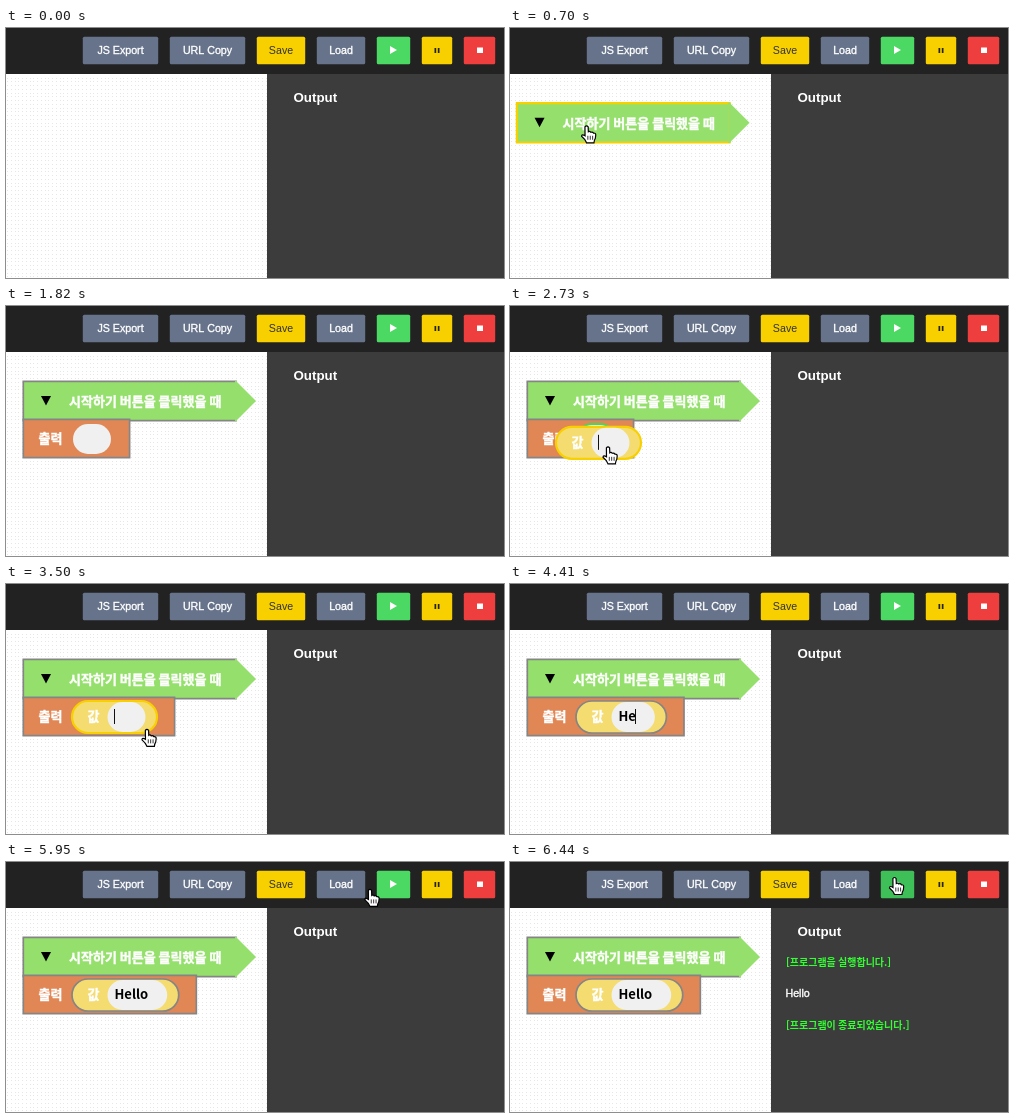
An HTML page with a canvas for the animation above (7350 ms loop, 498x250 px).

```html
<!DOCTYPE html>
<html lang="ko">
<head>
<meta charset="utf-8">
<style>
html, body { margin: 0; width: 100%; height: 100%; overflow: hidden; background: #3c3c3c; }
canvas { display: block; width: 498px; height: 250px; }
</style>
</head>
<body>
<canvas id="stage" width="498" height="250"></canvas>
<script>
const ctx = document.getElementById('stage').getContext('2d');
const LOOP = 7350, STEP = 70, DOT_GAP = 3.75;
const KOREAN = '"Noto Sans CJK KR", "Noto Sans CJK", sans-serif';
const LATIN = '"Liberation Sans", sans-serif';
const GOLD = '#f8d000', SLATE = '#66738a', EDGE = '#858585', INK = '#222';

const hand = new Path2D('M-1.6 1Q0-1 1.6 1L1.8 6Q3.3 5 4.2 6.5Q6 5.7 6.9 7.3Q9.2 7 9.2 9.2L8.8 12.5Q7.6 14.5 7.4 17L0 17Q-.8 14-5 10.5Q-4.8 7.8-1.5 10Z');

const easeOut = k => 1 - (1 - k) ** 2;
const easeInOut = k => k * k * (3 - 2 * k);
const within = (v, from, to) => v >= from && v < to;

// Each drag enters from the left edge, slows down and ends at the drop.
const drags = {
  start: { from: 420, to: 840, a: [-8, 95], b: [86, 97], ease: easeOut },
  print: { from: 1330, to: 1610, a: [5, 113], b: [83, 122], ease: easeOut },
  value: { from: 2240, to: 2800, a: [-10, 128], b: [98.7, 140], ease: easeOut }
};
const move = (from, to, a, b) => ({ from, to, a, b, ease: easeInOut });
const leave = ({ to, b }) => move(to, to + 210, b, [-16, b[1]]);

const field = [128, 138], rest = [162, 156], aside = [180, 149], overPrint = [186, 129], play = [383.5, 14.5];
const moves = [
  drags.start, leave(drags.start),
  drags.print, leave(drags.print),
  drags.value, move(2800, 2940, drags.value.b, aside),
  move(2940, 3220, aside, field), move(3220, 3360, field, field), move(3360, 4060, field, rest),
  move(5250, 5390, rest, overPrint), move(5390, 6090, overPrint, play), move(6090, LOOP, play, play)
];
moves[8].ease = k => easeInOut(Math.min(1, k * 2));

const pressed = t => Object.values(drags).some(d => within(t, d.from, d.from + 280))
  || within(t, 3220, 3360) || within(t, 6160, 6300);

function pointerAt(t) {
  const m = moves.find(m => within(t, m.from, m.to));
  if (!m) return null;
  const k = m.ease((t - m.from) / (m.to - m.from));
  const [x, y] = m.a.map((v, i) => v + (m.b[i] - v) * k);
  return { x, y };
}

// Two letters with a pause between, then the rest quickly.
function typedAt(t) {
  const slow = Math.floor((t - 4060) / 280) + 1;
  const fast = Math.floor((t - 4550) / 140) + 3;
  return 'Hello'.slice(0, Math.max(0, t < 4550 ? slow : fast));
}

function text(str, x, y, size, color, family = LATIN, weight = 400, thicken = 0) {
  ctx.font = `${weight} ${size}px ${family}`;
  ctx.fillStyle = color;
  ctx.fillText(str, x, y);
  if (thicken) {
    ctx.lineWidth = thicken;
    ctx.strokeStyle = color;
    ctx.strokeText(str, x, y);
  }
}

const label = (str, x, y) => text(str, x, y, 13, '#fff', KOREAN, 700, .4);

function pill(x, y, w, h, r, fill, stroke, line) {
  ctx.beginPath();
  ctx.roundRect(x, y, w, h, r);
  ctx.fillStyle = fill;
  ctx.fill();
  if (stroke) {
    ctx.lineWidth = line;
    ctx.strokeStyle = stroke;
    ctx.stroke();
  }
}

function triangle(points, color) {
  ctx.beginPath();
  points.forEach(p => ctx.lineTo(...p));
  ctx.fillStyle = color;
  ctx.fill();
}

const edge = hot => hot ? [GOLD, 2.2] : [EDGE, 1.7];

function startBlock(x, y, hot) {
  const green = '#95e06c';
  pill(x + .3, y + .4, 212.7, 39.3, 0, green, ...edge(hot));
  ctx.fillRect(x + 212, y, 2, 40);
  triangle([[x + 212, y], [x + 213, y], [x + 233, y + 20], [x + 213, y + 40], [x + 212, y + 40]], green);
  triangle([[x + 18, y + 15], [x + 28, y + 15], [x + 23, y + 24.5]], '#000');
  label('시작하기 버튼을 클릭했을 때', x + 46, y + 25);
}

function printBlock(x, y, width, hot, target) {
  pill(x + .3, y + .4, width - .7, 38.3, 0, '#e08755', ...edge(hot));
  label('출력', x + 15.5, y + 24);
  pill(x + 50, y + 5, 38, 30, 15, '#f0f0f0', target && '#46d65c', 2);
}

function valueBlock(x, y, width, typed, caret, hot) {
  pill(x + 1, y + 1, width + 47, 32, 16, '#f4dc70', ...edge(hot));
  label('값', x + 16.5, y + 21);
  pill(x + 36.5, y + 2, width, 30, 15, '#f0f0f0');
  text(typed, x + 43.5, y + 21, 13, '#000', KOREAN, 700);
  if (caret) {
    ctx.fillStyle = '#111';
    ctx.fillRect(Math.floor(x + 43.5 + ctx.measureText(typed).width), y + 9, 1, 15);
  }
}

function dottedPaper() {
  ctx.fillStyle = '#fff';
  ctx.fillRect(0, 46, 261, 204);
  ctx.fillStyle = '#e6e6e6';
  for (let y = .85 + 13 * DOT_GAP; y < 250; y += DOT_GAP)
    for (let x = 1.1; x < 261; x += DOT_GAP) ctx.fillRect(Math.round(x), Math.round(y), 1, 1);
}

function workspace(t, pointer) {
  ctx.save();
  ctx.beginPath();
  ctx.rect(0, 46, 261, 204);
  ctx.clip();
  dottedPaper();

  const typed = typedAt(t);
  ctx.font = `700 13px ${KOREAN}`;
  const fieldWidth = Math.max(38, ctx.measureText(typed).width + 26);
  const joined = t >= drags.value.to;
  const printWidth = joined ? fieldWidth + 114 : 107;
  const over = (x, y, w, h) => !!pointer && within(pointer.x, x, x + w) && within(pointer.y, y, y + h);
  const dragging = name => within(t, drags[name].from, drags[name].to);
  const onValue = joined && over(65, 116, fieldWidth + 49, 34);
  const onPrint = !dragging('value') && !onValue && over(17, 113, printWidth + 2, 39);

  if (t >= drags.start.to) startBlock(17, 75, !dragging('print') && over(17, 75, 233, 38));
  else if (dragging('start')) startBlock(pointer.x - 69, pointer.y - 22, true);

  if (t >= drags.print.to) printBlock(17, 113, printWidth, onPrint, dragging('value') && pointer.x > 80);
  else if (dragging('print')) printBlock(pointer.x - 70, pointer.y - 17, 107, true);

  const caret = t < 3780 || within(t, 4060, 5250);
  if (joined) valueBlock(65, 116, fieldWidth, typed, caret, onValue);
  else if (dragging('value')) valueBlock(pointer.x - 52, pointer.y - 20, 38, '', true, true);
  ctx.restore();
}

function header(t) {
  ctx.fillStyle = INK;
  ctx.fillRect(0, 0, 498, 46);
  const buttons = [
    [75, SLATE, 'JS Export'], [75, SLATE, 'URL Copy'], [48, GOLD, 'Save'], [48, SLATE, 'Load'],
    [33, t >= 6020 ? '#3fbf57' : '#4bd964'], [30, GOLD], [31, '#ee3e3e']
  ];
  let x = 77;
  ctx.textAlign = 'center';
  for (const [w, color, caption] of buttons) {
    pill(x - .2, 8.8, w + .4, 27.4, 1.5, color);
    const dark = color === GOLD;
    if (caption) text(caption, x + w / 2, 26, 10.67, dark ? '#333' : '#fff', LATIN, 400, dark ? 0 : .35);
    x += w + 12;
  }
  ctx.textAlign = 'left';
  triangle([[384, 18], [391, 22], [384, 26]], '#fff');
  ctx.fillStyle = INK;
  ctx.fillRect(428.5, 20, 1.7, 5);
  ctx.fillRect(431.8, 20, 1.7, 5);
  ctx.fillStyle = '#fff';
  ctx.fillRect(471, 19.5, 6, 5.5);
}

function output(t) {
  ctx.fillStyle = '#3c3c3c';
  ctx.fillRect(261, 46, 237, 204);
  text('Output', 287.5, 74, 13.33, '#fff', LATIN, 700);
  if (t < 6300) return;
  text('[프로그램을 실행합니다.]', 276, 104, 10, '#3f3', KOREAN, 700);
  text('Hello', 275.5, 135, 10.67, '#fff', LATIN, 400, .4);
  text('[프로그램이 종료되었습니다.]', 276, 167, 10, '#3f3', KOREAN, 700);
}

function drawPointer({ x, y }, ring) {
  if (ring) {
    ctx.beginPath();
    ctx.arc(x, y, 28.7, 0, Math.PI * 2);
    for (const [color, line] of [['#fff', 5.5], ['#000', 3]]) {
      ctx.strokeStyle = color;
      ctx.lineWidth = line;
      ctx.stroke();
    }
  }
  ctx.save();
  ctx.translate(x + 1, y + 1);
  ctx.fillStyle = '#fff';
  ctx.strokeStyle = '#000';
  ctx.lineWidth = 1.2;
  ctx.fill(hand);
  ctx.stroke(hand);
  ctx.beginPath();
  for (let fx = 1.3; fx < 7; fx += 2.4) {
    ctx.moveTo(fx, 10);
    ctx.lineTo(fx, 14);
  }
  ctx.lineWidth = .8;
  ctx.stroke();
  ctx.restore();
}

function draw(t) {
  const pointer = pointerAt(t);
  workspace(t, pointer);
  output(t);
  header(t);
  if (pointer) drawPointer(pointer, pressed(t));
}

const began = performance.now();
function frame() {
  const t = (performance.now() - began) % LOOP;
  draw(Math.floor(t / STEP) * STEP);
  requestAnimationFrame(frame);
}
frame();
</script>
</body>
</html>
```
